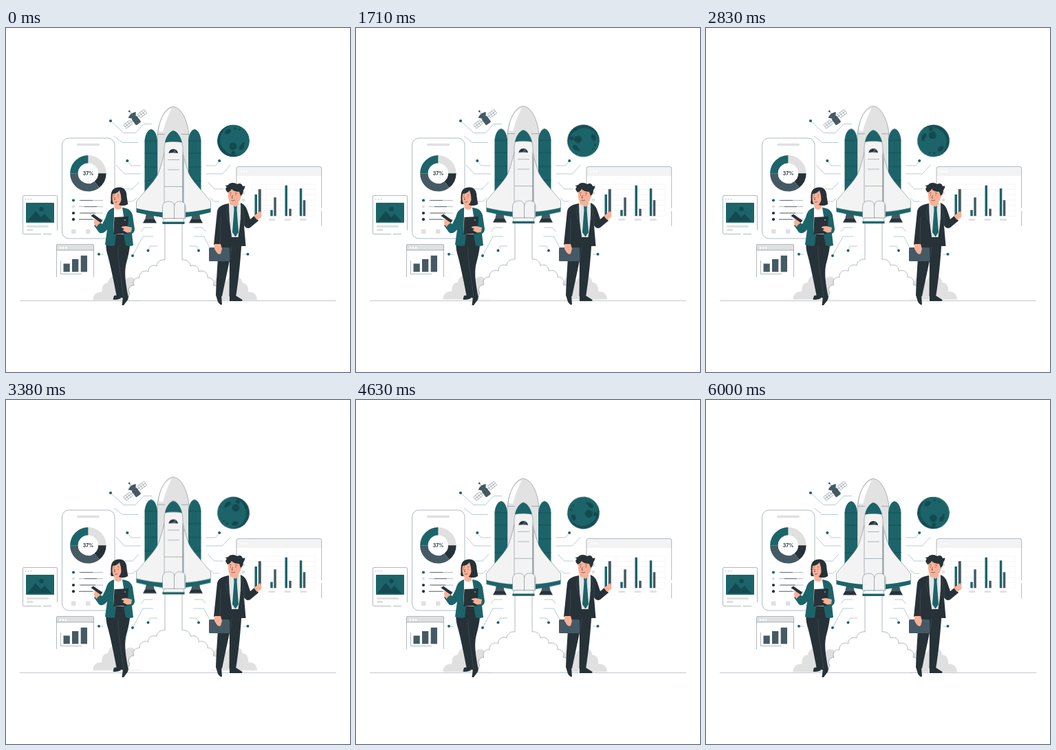
Recreate the animation shown at these times as an HTML page. Size 500 px wide and 500 px high, loop 6040 ms.

```html
<!DOCTYPE html>
<html lang="en">
<head>
<meta charset="utf-8">
<title>Rocket launch</title>
<style>
  html, body { margin: 0; width: 100%; height: 100%; overflow: hidden; background: #fff; }
  svg { display: block; width: 100vw; height: 100vh; }
  .teal { fill: #1c6469; }
  .deep { fill: #124a50; }
  .dark { fill: #263238; }
  .slate { fill: #455a64; }
  .pale { fill: #e0e0e0; }
  .mist { fill: #f3f3f3; }
  .white { fill: #fff; }
  .skin { fill: #fbb197; }
  .ink { stroke: #455a64; stroke-width: .42; }
  .line { fill: none; stroke: #455a64; stroke-width: .42; }
  .wire { fill: none; stroke: #6d9a9d; stroke-width: .5; }
  .grid { fill: none; stroke: #ededed; stroke-width: .5; }
  .fold { fill: none; stroke: #54656d; stroke-width: .4; }
  .bob { animation: bob 1510ms cubic-bezier(.37, 0, .63, 1) infinite; }
  .spin { transform-origin: 330.5px 164px; animation: spin 6040ms linear infinite; }
  @keyframes bob { 50% { transform: translateY(-5.3px); } }
  @keyframes spin { to { transform: rotate(360deg); } }
  text { font: 700 7px Inter, "Open Sans", sans-serif; fill: #263238; text-anchor: middle; }
</style>
</head>
<body>
<svg viewBox="0 0 500 500">
  <defs>
    <clipPath id="disc"><circle cx="330.5" cy="164" r="23.6"/></clipPath>

    <path id="puff" class="pale" d="M126.500 395.500 C126.500 388 131 383.500 139.500 383.500
      C138.500 375 143 370.500 148 370.500 C149 363.500 154.500 359.500 161 360.500 C167 361 170 365 171 369
      C175 361 184 360 188 366 L195 395.500Z"/>

    <g id="smoke">
      <path class="white" d="M244 325 H231 V337 C224 336 219 341 219 346 C212 343 206 348 207 354
        C200 351 193 356 194 363 C187 362 183 369 186 374 C179 374 176 381 180 386 Q177 390 179 395 H244Z"/>
      <path class="line" d="M231 284 V337 C224 336 219 341 219 346 C212 343 206 348 207 354
        C200 351 193 356 194 363 C187 362 183 369 186 374 C179 374 176 381 180 386 Q178 388 178 391"/>
    </g>

    <g id="booster">
      <path class="teal" d="M201.500 262 V164 C202 155 206 148 211 147 C216 148 219.500 155 220 164 V262Z"/>
      <path d="M201.500 164 H220 M201.500 182 H220 M201.500 202 H220 M201.500 222 H220"
        fill="none" stroke="#124a50" stroke-width=".7"/>
      <path class="slate" d="M204 270 H214 L216 279 H202Z"/>
      <path class="dark" d="M202 278 H216 L219 283.500 H199Z"/>
    </g>

    <g id="wing">
      <path class="mist ink" d="M231 178 C228 190 225 202 221 212 C217 220 210 228 203 236 L189.500 252 V263 L231 271Z"/>
      <path class="teal" d="M189.500 262 Q210 267 229 268 V275.500 Q209 273 189.500 268Z"/>
    </g>

    <g id="wires" class="wire">
      <path d="M176 193 L182 200 H196"/>
      <path d="M160 199 L172 212 H196"/>
      <path d="M193 224 L184 234 H171"/>
      <path d="M190 247 L184 252 H176"/>
      <path d="M213 290 H201 L196 296"/>
      <path d="M214 303 H199 L184 331"/>
      <path d="M220 317 H209.500 L206.500 323"/>
      <path d="M135 329 H142"/>
      <g class="teal" stroke="none">
        <circle cx="176.300" cy="193" r="2.100"/>
        <circle cx="206.500" cy="323.500" r="2"/>
        <circle cx="135" cy="328.800" r="2"/>
      </g>
    </g>

    <g id="panel">
      <path class="white ink" d="M-5.700 -3.400 H5.700 V3.400 H-5.700Z"/>
      <path class="line" d="M-1.900 -3.400 V3.400 M1.900 -3.400 V3.400 M-5.700 0 H5.700"/>
    </g>
    <g id="dots">
      <circle r="1.300"/><circle cx="4" r="1.300"/><circle cx="8" r="1.300"/>
    </g>
  </defs>

  <!-- ground -->
  <path d="M20 396.500 H480" stroke="#a9b2b6" stroke-width=".7"/>

  <!-- circuit traces -->
  <use href="#wires"/>
  <use href="#wires" transform="matrix(-1 0 0 1 486.500 0)"/>
  <circle class="teal" cx="184" cy="331" r="2"/>
  <path class="wire" d="M152 135 L171 152.500 H188 L200 139.500 H212 M157 157 L169 166.500 H192"/>
  <circle class="teal" cx="152" cy="135" r="2.100"/>

  <!-- satellite -->
  <g transform="translate(187.700 132.200) rotate(-37)" stroke-width=".6">
    <path class="line" d="M-8 0 H8"/>
    <use href="#panel" x="-12.900"/>
    <use href="#panel" x="12.900"/>
    <rect class="slate" x="-4.500" y="-3" width="9" height="11.500" rx="1.500"/>
    <path class="slate" d="M-2.500 -2 L-7 -7.500 Q0 -11.500 7 -7.500 L2.500 -2Z"/>
    <circle class="slate" cx="0" cy="-14" r="1.400"/>
    <path class="line" d="M0 -13 V-8"/>
  </g>

  <!-- planet -->
  <g class="spin" clip-path="url(#disc)">
    <circle class="teal" cx="330.500" cy="164" r="23.500"/>
    <path class="deep" d="M330.500 140.500 A23.500 23.500 0 1 0 345 182.500 A23.500 23.500 0 0 1 311.500 165 C311 153 318 143 330.500 140.500Z" opacity=".8"/>
    <g class="deep">
      <circle cx="330" cy="172" r="5.500"/>
      <ellipse cx="322.500" cy="150.500" rx="5" ry="3.300" transform="rotate(-30 322.500 150.500)"/>
      <circle cx="333" cy="146" r="1.700"/>
      <ellipse cx="342.500" cy="173" rx="3" ry="5" transform="rotate(35 342.500 173)"/>
      <circle cx="330.500" cy="181.500" r="3"/>
      <circle cx="345" cy="168" r="1.800"/>
      <circle cx="339" cy="148" r="1.300"/>
      <ellipse cx="317" cy="179" rx="2" ry="3" transform="rotate(-40 317 179)"/>
    </g>
  </g>

  <!-- phone dashboard -->
  <rect class="white ink" x="81.500" y="160" width="76.500" height="146" rx="10"/>
  <rect class="pale" x="103" y="167.700" width="33" height="3.600" rx="1.800"/>
  <g fill="none" stroke-width="11.500" transform="translate(119.400 211.300)">
    <path d="M0 -20.500 A20.500 20.500 0 0 1 20.500 0" stroke="#e0e0e0"/>
    <path d="M20.500 0 A20.500 20.500 0 0 1 12.700 16.100" stroke="#263238"/>
    <path d="M12.700 16.100 A20.500 20.500 0 0 1 -20.500 0" stroke="#455a64"/>
    <path d="M-20.500 0 A20.500 20.500 0 0 1 0 -20.500" stroke="#1c6469"/>
  </g>
  <text x="119.500" y="214">37%</text>
  <circle class="teal" cx="98" cy="250.500" r="2.100"/>
  <circle class="pale" cx="98" cy="259.700" r="2.100"/>
  <circle class="dark" cx="98" cy="269" r="2.100"/>
  <circle class="dark" cx="98" cy="278.200" r="2.100"/>
  <path d="M106 250.500 H141 M106 259.700 H141 M106 269 H141 M106 278.200 H141" stroke="#65757c" stroke-width=".5"/>
  <path d="M108 250.500 H126 M114 259.700 H132 M108 269 H130 M106 278.200 H126" stroke="#263238" stroke-width=".6"/>
  <rect class="pale" x="95" y="292.500" width="6.500" height="6.500" rx="1"/>
  <rect class="pale" x="116" y="292.500" width="6.500" height="6.500" rx="1"/>

  <!-- picture card -->
  <path class="white ink" d="M74.500 294 V245 Q74.500 243.500 73 243.500 H26 Q24.500 243.500 24.500 245 V297.500 Q24.500 299.500 26 299.500 H51"/>
  <path class="line" d="M54 299.500 H66"/>
  <use href="#dots" x="28.500" y="248.700" class="pale"/>
  <rect class="teal" x="29" y="254" width="41" height="29" rx="1"/>
  <circle class="deep" cx="51.500" cy="263.300" r="3.200"/>
  <path class="deep" d="M31 281 L43 266 L51 275 L56 270 L66 281Z"/>
  <rect class="pale" x="30" y="286.700" width="32" height="3.300" rx="1.600"/>
  <rect class="pale" x="30" y="291.700" width="9.500" height="3.300" rx="1.600"/>

  <!-- bar card -->
  <path class="pale" d="M73.500 323 V315 H127.500 V323Z"/>
  <path class="line" d="M73.500 362 V316 Q73.500 314.500 75 314.500 H126 Q127.500 314.500 127.500 316 V362 M73.500 323 H127.500"/>
  <use href="#dots" x="79" y="319.500" class="white"/>
  <path class="line" d="M79.500 338 V357.500 H110"/>
  <path class="slate" d="M83.500 342.500 h9.300 v12 h-9.300Z M96 336 h9.300 v18.500 h-9.300Z M108.700 330.700 h9.300 v23.800 h-9.300Z"/>

  <!-- chart window -->
  <path class="mist" d="M335 215 V204 Q335 202 337 202 H457 Q459 202 459 204 V215Z"/>
  <path class="line" d="M335 285 V204.500 Q335 201.500 338 201.500 H456 Q458.700 201.500 458.700 204.500 V262 M458.700 266 V288"/>
  <use href="#dots" x="342" y="208.700" class="white"/>
  <path class="grid" d="M357 227 H449 M357 234.700 H449 M357 242.400 H449 M357 250 H449 M357 257.700 H449 M357 265.300 H449
    M357 273.500 H449 M357 227 V273 M378 227 V273 M399 227 V273 M421 227 V273 M449 227 V273"/>
  <path class="teal" d="M361.500 242 h3.500 v31.300 h-3.500Z M384.300 264.500 h3.500 v8.800 h-3.500Z M405.500 228.700 h3.500 v44.600 h-3.500Z M426.800 233.300 h3.500 v40 h-3.500Z"/>
  <path class="slate" d="M366.800 234.300 h4 v39 h-4Z M389.300 246.300 h3.500 v27 h-3.500Z M411.300 262.700 h3.500 v10.600 h-3.500Z M431.800 250.300 h3.500 v23 h-3.500Z"/>
  <g class="pale">
    <rect x="381.500" y="277.300" width="10" height="2.700" rx="1.300"/>
    <rect x="404.500" y="277.300" width="10" height="2.700" rx="1.300"/>
    <rect x="427" y="277.300" width="10" height="2.700" rx="1.300"/>
    <circle cx="345" cy="240" r="2.300"/><circle cx="345" cy="250" r="2.300"/>
  </g>

  <!-- rocket and smoke -->
  <g class="bob">
    <use href="#puff"/>
    <use href="#puff" transform="matrix(-1 0 0 1 491.500 0)"/>
    <use href="#smoke"/>
    <use href="#smoke" transform="matrix(-1 0 0 1 487 0)"/>

    <path fill="#e2e2e2" class="ink" d="M220 262 V160 C220 139 230 115 243 114.500 C256 115 266 139 266 160 V262Z"/>
    <path class="white" d="M222.500 150 C223.500 136 229 121 241 117 C236 126 231 139 228 151Z"/>
    <path class="line" d="M220 154.500 H231 M255 154.500 H266"/>
    <use href="#booster"/>
    <use href="#booster" transform="matrix(-1 0 0 1 485 0)"/>
    <use href="#wing"/>
    <use href="#wing" transform="matrix(-1 0 0 1 487 0)"/>

    <path class="mist ink" d="M230 278 V176 C230 170 231 167 232 165 H255 C256 168 257 171 257 176 V278Z"/>
    <path d="M257 184 V256" stroke="#aab1b4" stroke-width="2"/>
    <path class="line" d="M258.200 190 V254"/>
    <path class="teal" d="M231 166.500 C232.500 158 238 150 243.200 149 C249 150 254 158 256 166.500 Q243 164 231 166.500Z"/>
    <path class="dark" d="M236.500 182 C237 178 240 176 243.200 176 S249.500 178 250 182 Q243 180.500 236.500 182Z"/>
    <path class="slate" d="M242 181.200 L245 176.300 L247.500 177.500 L246 181.300Z"/>
    <path class="line" d="M235 191.500 H252 M235 206 H252 M230.500 230.500 H257"/>
    <path class="mist ink" d="M227.500 277 V261 C227.500 255 231 252 236.500 252 S245 255 245 261 V277Z"/>
    <path class="mist ink" d="M244.500 277 V261 C244.500 255 247 252 252.500 252 S261 255 261 261 V277Z"/>
    <path d="M259.900 257 V277" stroke="#b4babd" stroke-width="1.800"/>
    <path class="white ink" d="M230 277 H258 L259 282 H228Z"/>
    <rect class="teal" x="227.500" y="281.700" width="32" height="3.300" rx=".600"/>
  </g>

  <!-- woman -->
  <g>
    <path class="dark" d="M157 389 L165 388 L167 393 Q160 396 155.500 394.500Z M170 391 L178 390 L177 395 L171 403 H168.500Z"/>
    <path class="dark" d="M148 300 C144 311 145 321 148 331 C152 346 156 365 161 391 L175 393 L177.500 390
      C174 371 172 358 174 346 C177 333 181 322 181 298Z"/>
    <path class="fold" d="M163 318 C162 338 168 366 171 391"/>
    <path class="white" d="M157 261 H170 L174 300 H156Z"/>
    <path class="skin" d="M158 252 H168 V262 Q163 266 158 262Z"/>
    <path class="teal" d="M157 261 C150 263 147 267 145 275 L140 285 L134 281 L128 287 L135 297 Q139 300 144 296 L147 293
      L144 315 Q152 318 158 316 L160 300 L156 298 L157 275Z"/>
    <path class="teal" d="M169 261 C178 262 182 265 184 272 L187 292 Q187 297 183 299 L185 316 Q179 318 174 316 L171 300 L172 280Z"/>
    <path d="M157 262 L156 275 M170 262 L172 274" class="fold"/>
    <path class="skin" d="M128.500 285 C127 281 129 278 132 277.500 L138 279 L139 282 L134 286 L131.500 289Z"/>
    <path class="dark" d="M123.500 273 L127 270.500 L140.500 280 L137.500 283Z"/>
    <path class="dark" d="M157.500 275 L178 274 L176.500 299 L156 300Z"/>
    <circle cx="173" cy="279" r=".800" fill="#e0e0e0"/>
    <path class="skin" d="M183 290 L175 288 Q169 287.500 167.500 290 L172 292 L169.500 294 L176 297.500 L182 296.500Z"/>
    <path class="dark" d="M164 231.500 C172 231 175.500 237 175.500 245 L177.300 256 Q171 260 164 257 L155 256 Q151 257 152.500 250 C152 238 154 232 164 231.500Z"/>
    <path class="skin" d="M155 241 Q161 241 165 236 Q167.500 243 167.500 249 C166.500 256 162 259 159 258 C155 256 153.500 248 155 241Z"/>
    <path d="M156.500 245 v1.400 M163 245 v1.400 M155.800 243 l2 -.500 M162 242.500 l2.300 .500 M158.500 246 l-1 3.500 h1.500 M158 253 q2.300 .800 4 -.800"
      fill="none" stroke="#263238" stroke-width=".600"/>
  </g>

  <!-- man -->
  <g>
    <path class="dark" d="M305 388 H313 L314 402 Q311 403 308 398Z M325 389 H334 L343.500 395 Q344 397 341 397 H325Z"/>
    <path class="dark" d="M310 303 C308 335 306 362 305 389 L314 390 L325 338 L324.500 390 L334 391 C338 365 341 338 343 303Z"/>
    <path class="fold" d="M325 338 L328 318"/>
    <path fill="#e3e5e6" d="M323 256 L341 255 L343 304 H323Z"/>
    <path class="teal" d="M331 258 H336 L335.500 264 L338 297 L333.500 303.500 L329 297 L331.500 264Z"/>
    <path class="dark" d="M324 255 C314 257 309 259 307 266 L302 315 L312 316 L310 320 H326 L328 303 Q324 280 324 255Z"/>
    <path class="dark" d="M341 254 C347 257 349 260 351 266 L355 278 L362 272 L367 280 L355 290 Q350 293 346 287 L348.500 317 H336 L338 300 Q342 280 341 254Z"/>
    <path class="fold" d="M312 275 L311 314 M346 270 L346 288 M323 257 L320 269 L325 285 M341 256 L345 267 L340 282"/>
    <path class="skin" d="M325 248 H338 V256 L334 260 L325 256Z"/>
    <path class="skin" d="M360 273 L366 269 L369.500 266 L370.500 268 L371.500 271 L371 275 L365 279Z"/>
    <rect class="slate" x="295" y="319" width="30" height="20" rx="1.500"/>
    <path class="line" d="M296 320 L309 329 L324 320" opacity=".6"/>
    <path class="skin" d="M303 314 H312 L314 321 L312 328 Q309 330 306 326 L303 321Z"/>
    <path class="skin" d="M323 236 Q331 232 340 237 L341 242 Q344 243 341 247 C340 253 335 256 330 256 C325 256 322 250 323 236Z"/>
    <path class="dark" d="M322 239 Q317 234 321 231 L318.500 229 Q323 229 325 226 Q331 223.500 336 227 Q342 224 344 230 L347.500 229.500
      Q347 234 345 236 Q345 241 341 244 L339 238 Q331 238 328 234 Q326 238 322 239Z"/>
    <path d="M326.500 242 v1.500 M334 242 v1.500 M325 240 l2.500 -.500 M333 239.700 l3 .700 M329.500 243 l-1.500 4 h2 M327.500 250.500 q3 1.300 5.500 -.500"
      fill="none" stroke="#263238" stroke-width=".600"/>
  </g>
</svg>
</body>
</html>
```
